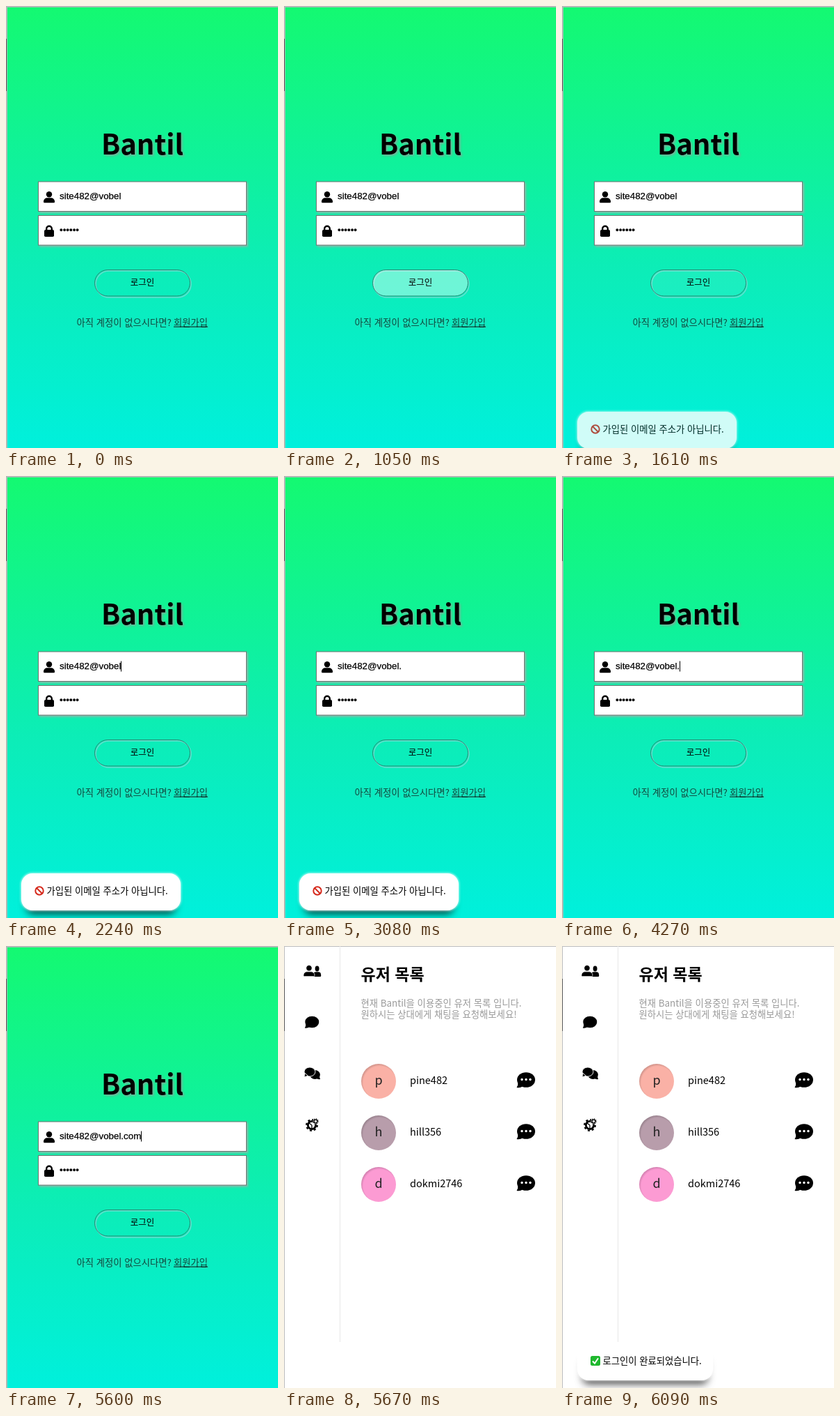
Recreate the animation shown at these times as an HTML page. Size 391 px wide and 634 px high, loop 6860 ms.

```html
<!DOCTYPE html>
<html lang="ko">
<head>
<meta charset="utf-8">
<style>
  html, body { margin: 0; width: 100%; height: 100%; overflow: hidden; background: #fff; }
  #stage { position: relative; width: 391px; height: 634px; overflow: hidden; }
  svg { display: block; }
  #stage, text { font: 13.33px "Noto Sans CJK KR", "Noto Sans CJK", sans-serif; }
  #stage .title { font-size: 40px; font-weight: 700; filter: drop-shadow(2px 2px 1.5px #999b); }
  #stage .field { font-family: "Liberation Sans", Arial, sans-serif; stroke: #000; stroke-width: .25; }
  #stage .label { font-size: 12.5px; font-weight: 500; }
  #stage .head { font-size: 23px; font-weight: 700; }
  #stage .name { font-size: 14.5px; font-weight: 500; }
  #stage .initial { font-size: 18px; fill: #222; }
  .box { fill: #fff; stroke: #6a7470; filter: drop-shadow(2px 2px 1.5px #aaac); }
  .soft { fill: #000a; filter: drop-shadow(1px 1px 1px #9998); }
  .mid { text-anchor: middle; }
  .toast {
    position: absolute; left: 22px; top: 570px; height: 53px; border-radius: 16px;
    box-sizing: border-box; padding-left: 19px; background: #fff; line-height: 50px; white-space: nowrap;
    box-shadow: 0 0 3px 1px #fffa, 0 13px 12px -8px #000b;
  }
  .toast svg { display: inline-block; vertical-align: -2px; margin-right: 3.5px; }
</style>
</head>
<body>
<div id="stage">
  <svg width="391" height="634">
    <defs>
      <linearGradient id="sky" x2="0" y2="1">
        <stop stop-color="#14f971"/><stop offset=".6" stop-color="#0cedb8"/><stop offset="1" stop-color="#00f0dc"/>
      </linearGradient>
      <radialGradient id="rim" cx=".53" cy=".54" r=".53">
        <stop offset=".88" stop-opacity="0"/><stop offset="1" stop-opacity=".15"/>
      </radialGradient>
      <g id="person">
        <circle cx="8" cy="4.2" r="4.2"/>
        <path d="M0 15v-1a5 5 0 0 1 5-4.7h6a5 5 0 0 1 5 4.7v1q0 1.200-1.200 1.200H1.200Q0 16.200 0 15z"/>
      </g>
      <g id="bubble">
        <ellipse rx="13" ry="10.800"/>
        <path d="M-11.500 3q0 5-2 8 5 1 9-2z"/>
      </g>
    </defs>

    <g id="login">
      <rect width="391" height="634" fill="url(#sky)"/>
      <path d="M391 1H1v633" fill="none" stroke="#adbdb5" stroke-width="2"/>
      <text class="title mid" x="196" y="213">Bantil</text>
      <rect class="box" x="46.500" y="252" width="299" height="42.500"/>
      <rect class="box" x="46.500" y="300.500" width="299" height="42.500"/>
      <use href="#person" x="54" y="266"/>
      <rect x="55" y="321" width="14" height="10" rx="1.800"/>
      <path d="M58.200 322v-2.500a3.800 3.800 0 0 1 7.600 0v2.500" fill="none" stroke="#000" stroke-width="2.400"/>
      <text id="email" class="field" x="77" y="277"></text>
      <path id="caret" d="M0 265.500v15" stroke="#000"/>
      <text class="field" x="77" y="326">••••••</text>
      <rect x="129" y="380" width="137" height="38" rx="19" fill="none" stroke="#bcd8" stroke-width="1.500"/>
      <rect id="button" x="127.500" y="378.500" width="137" height="37.500" rx="18.700" fill="#fff" stroke="#2b8873"/>
      <text class="label mid" x="196" y="401">로그인</text>
      <text class="soft" x="101.500" y="458.500">아직 계정이 없으시다면?</text>
      <text class="soft" x="241" y="458.500" text-decoration="underline">회원가입</text>
    </g>

    <g id="list">
      <rect width="391" height="634" fill="#fff"/>
      <path d="M391 .5H.5v634" fill="none" stroke="#bbb"/>
      <path d="M80.500 0v568" stroke="#e8e8e8"/>
      <use href="#person" transform="translate(42 28.500) scale(.7 .95)"/>
      <use href="#person" x="28" y="27.500" stroke="#fff" stroke-width=".8"/>
      <use href="#bubble" transform="translate(40.300 109) scale(.77)"/>
      <use href="#bubble" transform="translate(44.500 184.500) scale(-.57 .6)"/>
      <use href="#bubble" transform="translate(37 180.500) scale(.61)" stroke="#fff" stroke-width="1.500"/>
      <g fill="none" stroke="#000">
        <circle cx="40" cy="257" r="5.600" stroke-width="2.800"/>
        <circle cx="40" cy="257" r="7.800" stroke-width="2.200" stroke-dasharray="3 3.130"/>
        <path d="M40 257l-4-3m4 3v5" stroke-width="1.300"/>
        <circle cx="45.500" cy="251.500" r="4" fill="#fff" stroke="none"/>
        <circle cx="45.500" cy="251.500" r="2.400" stroke-width="1.400"/>
        <circle cx="45.500" cy="251.500" r="3.600" stroke-width="1.200" stroke-dasharray="1.400 1.430"/>
      </g>
      <text class="head" x="110.500" y="49">유저 목록</text>
      <g fill="#999">
        <text x="110.500" y="87">현재 Bantil을 이용중인 유저 목록 입니다.</text>
        <text x="110.500" y="103">원하시는 상대에게 채팅을 요청해보세요!</text>
      </g>
      <g id="users"></g>
    </g>

    <path d="M.5 47v75" stroke="#555"/>
  </svg>

  <div class="toast" id="fail" style="width:229px"><svg width="14" height="14"><g fill="none" stroke="#d5291c" stroke-width="2"><circle cx="7" cy="7" r="5.700"/><path d="M3 3l8 8"/></g></svg>가입된 이메일 주소가 아닙니다.</div>
  <div class="toast" id="done" style="width:195px"><svg width="14" height="14"><rect width="14" height="14" rx="2.500" fill="#1fb82e"/><path d="M3 7.500l3 3.200 5-7.500" fill="none" stroke="#fff" stroke-width="2"/></svg>로그인이 완료되었습니다.</div>
</div>

<script>
const LOOP = 6860, ADDRESS = 'site482@vobel.com', TYPED = [2730, 4410, 4830, 4900];
const $ = id => document.getElementById(id);
const clamp = v => Math.min(1, Math.max(0, v));
const ramp = (t, start, length) => clamp((t - start) / length);

// CSS "ease": cubic-bezier(.25, .1, .25, 1)
function ease(x) {
  let low = 0, high = 1, s = x;
  for (let i = 0; i < 20; i++) {
    s = (low + high) / 2;
    const at = .75 * s * (1 - s) + s ** 3;
    if (at < x) low = s; else high = s;
  }
  return .3 * s * (1 - s) ** 2 + 3 * s * s * (1 - s) + s ** 3;
}

$('users').innerHTML = [['pine482', '#fab1a6'], ['hill356', '#b89dab'], ['dokmi2746', '#fc9bd3']]
  .map(([name, color], i) => `<g transform="translate(0 ${i * 74})">
    <circle cx="136" cy="194" r="25" fill="${color}"/>
    <circle cx="136" cy="194" r="25" fill="url(#rim)"/>
    <text class="initial mid" x="136" y="199">${name[0]}</text>
    <text class="name" x="181" y="198">${name}</text>
    <use href="#bubble" x="348" y="192"/>
    <g fill="#fff">${[342, 348, 354].map(x => `<circle cx="${x}" cy="191.500" r="1.700"/>`).join('')}</g>
  </g>`).join('');

function showToast(id, shown) {
  const style = $(id).style;
  style.opacity = shown;
  style.transform = `translateY(${Math.round(64 * (1 - shown))}px)`;
}

function draw(t) {
  const listed = t >= 5670;
  $('login').style.display = listed ? 'none' : '';
  $('list').style.display = listed ? '' : 'none';

  const text = ADDRESS.slice(0, 13 + TYPED.filter(at => t >= at).length);
  const email = $('email');
  if (email.textContent !== text) email.textContent = text;
  const blink = t >= 3080 && t < 3290;
  $('caret').style.display = t >= 2100 && !blink && !listed ? '' : 'none';
  if (!listed) {
    const x = Math.floor(77 + email.getComputedTextLength()) + .5;
    $('caret').setAttribute('transform', `translate(${x})`);
  }

  const hover = ease(ramp(t, 880, 340)) - ease(ramp(t, 1380, 400));
  $('button').setAttribute('fill-opacity', .5 * hover);

  showToast('fail', ease(ramp(t, 1390, 430)) * (1 - ramp(t, 3780, 490) ** 3));
  showToast('done', ease(ramp(t, 5650, 430)));
}

const start = performance.now();
function tick() {
  draw((performance.now() - start) % LOOP);
  requestAnimationFrame(tick);
}
tick();
</script>
</body>
</html>
```
